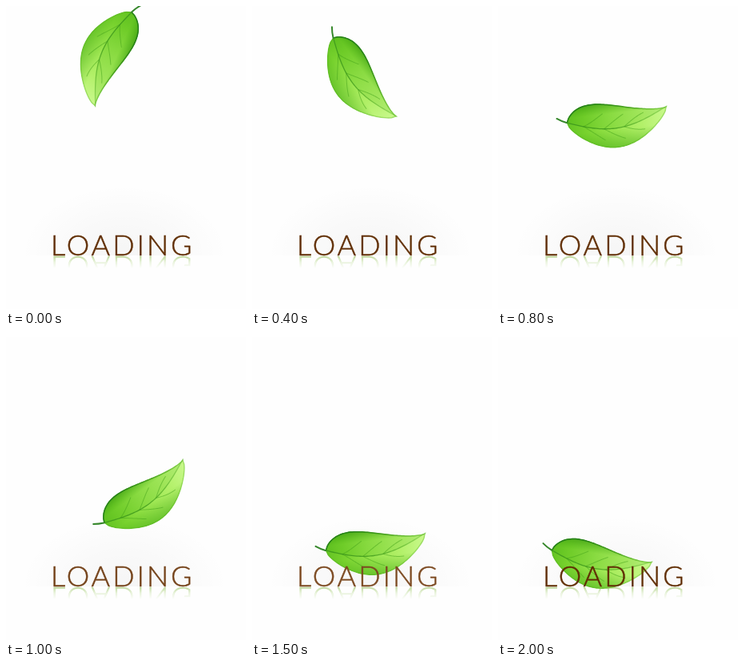
An HTML page with a canvas for the animation above (2500 ms loop, 300 px wide and 379 px high).

```html
<!DOCTYPE html>
<html lang="en">
<head>
<meta charset="utf-8">
<title>Loading</title>
<style>
html, body { margin: 0; width: 100%; height: 100%; overflow: hidden; background: #fefefe; }
canvas { display: block; }
</style>
</head>
<body>
<canvas id="stage" width="300" height="379" aria-label="Loading"></canvas>
<script>
const ctx = document.getElementById('stage').getContext('2d');
const STEP = 100, LOOP = 2500, LAST = 20, BASE = 312;
const LENGTH = 139, STEM = 12;

// Key poses: step, centre x, centre y, angle in degrees
const poses = [
  [0, 140, 62.5, 114], [4, 140.5, 82, 54], [8, 142, 133, -6.6], [10, 165, 193.5, -36],
  [12, 195, 216.5, -42], [13, 185, 232, -36], [15, 148, 253.5, -7], [18, 124.5, 269.5, 9.5]
];

// Smooth spline through the key poses
function poseAt(t) {
  let i = 0;
  while (i < poses.length - 2 && t > poses[i + 1][0]) i++;
  const b = poses[i], c = poses[i + 1];
  const a = poses[i - 1] || b, d = poses[i + 2] || c;
  const span = c[0] - b[0], u = Math.min(1, (t - b[0]) / span);
  const u2 = u * u, u3 = u2 * u;
  return [1, 2, 3].map(n => {
    const m0 = (c[n] - a[n]) / (c[0] - a[0]) * span;
    const m1 = (d[n] - b[n]) / (d[0] - b[0]) * span;
    return b[n] * (2 * u3 - 3 * u2 + 1) + m0 * (u3 - 2 * u2 + u) + c[n] * (3 * u2 - 2 * u3) + m1 * (u3 - u2);
  });
}

// The blade runs from u = 0 at the stem to u = 1 at the tip
const sinPi = u => Math.max(0, Math.sin(Math.PI * u));
const ribY = u => 6.5 * (1 - u) + 17 * sinPi(u);
const upperY = u => ribY(u) - 127 * u ** .75 * (1 - u) ** 1.4;
const lowerY = u => ribY(u) + 24.5 * Math.sqrt(sinPi(u));

function plot(path, f, from = 0, to = 1) {
  for (let i = 0; i <= 60; i++) {
    const u = from + (to - from) * i / 60;
    path.lineTo(STEM + u * (LENGTH - STEM), f(u));
  }
  return path;
}

function ramp(gradient, ...colors) {
  colors.forEach((c, i) => gradient.addColorStop(i / (colors.length - 1), c));
  return gradient;
}
const along = (...colors) => ramp(ctx.createLinearGradient(0, 0, LENGTH, 0), ...colors);
const across = (y0, y1, ...colors) => ramp(ctx.createLinearGradient(0, y0, 0, y1), ...colors);

const upperEdge = plot(new Path2D(), upperY);
const midrib = plot(new Path2D(), ribY);
const body = plot(plot(new Path2D(), upperY), lowerY, 1, 0);
const topHalf = plot(plot(new Path2D(), upperY), ribY, 1, 0);
const stem = new Path2D(`M.5 0Q6 4 ${STEM} 6.5`);
const veins = new Path2D();
for (const edge of [upperY, lowerY]) {
  for (const start of [.16, .36, .56]) {
    const vein = u => {
      const k = (u - start) / .2;
      return ribY(u) + (edge(u) - ribY(u)) * .6 * k;
    };
    const part = plot(new Path2D(), vein, start, start + .2);
    veins.addPath(part);
  }
}

const bladeFill = along('#58bb1c', '#78d22e', '#98e44c', '#b2f068', '#caf98e');
const topShade = across(-13, 16, 'rgba(40,140,5,.6)', 'rgba(60,170,10,.15)', 'rgba(60,170,10,.15)');
const lowShade = across(22, 45, 'rgba(60,165,15,0)', 'rgba(60,165,15,.5)');
const edgeTint = along('#25801a', '#25801a', 'rgba(50,140,20,.6)', 'rgba(110,200,50,.3)');
const ribTint = along('#3f9a1c', 'rgba(63,154,28,.8)', 'rgba(90,180,40,.4)');

function line(path, color, width) {
  ctx.strokeStyle = color;
  ctx.lineWidth = width;
  ctx.stroke(path);
}

function fill(path, color) {
  ctx.fillStyle = color;
  ctx.fill(path);
}

function drawLeaf(t) {
  const [x, y, angle] = poseAt(t);
  ctx.save();
  ctx.translate(x, y);
  ctx.rotate(angle * Math.PI / 180);
  ctx.translate(-LENGTH / 2, 0);
  ctx.lineCap = 'round';
  ctx.save();
  ctx.clip(body);
  fill(body, bladeFill);
  fill(body, lowShade);
  fill(topHalf, topShade);
  line(body, 'rgba(80,175,30,.35)', 3);
  line(upperEdge, edgeTint, 3);
  ctx.restore();
  line(veins, 'rgba(65,160,25,.5)', 1);
  line(midrib, ribTint, 1.3);
  line(stem, '#35872a', 2);
  ctx.restore();
}

function drawFloor() {
  ctx.save();
  ctx.translate(148, BASE);
  ctx.scale(1, .68);
  const glow = ctx.createRadialGradient(0, 0, 0, 0, 0, 130);
  ctx.fillStyle = ramp(glow, 'rgba(0,0,0,.035)', 'rgba(0,0,0,.018)', 'rgba(0,0,0,0)');
  ctx.fillRect(-150, -150, 300, 150);
  ctx.restore();
}

function drawWord(t) {
  ctx.font = '300 36px Lato, "Open Sans", sans-serif';
  ctx.letterSpacing = '3px';
  ctx.lineWidth = .5;
  const light = sinPi((t - 8) / 10) * (t > 8 && t < 18);
  const ink = `rgb(${96 + 34 * light},${46 + 34 * light},${4 + 36 * light})`;
  const write = (color, y, flip) => {
    ctx.save();
    ctx.translate(56, y);
    ctx.scale(1, flip);
    ctx.fillStyle = ctx.strokeStyle = color;
    ctx.fillText('LOADING', 0, 0);
    ctx.strokeText('LOADING', 0, 0);
    ctx.restore();
  };
  write(across(0, -15, 'rgba(140,185,80,.5)', 'rgba(150,200,90,.18)', 'rgba(150,200,90,0)'), BASE + 1, -1);
  write(ink, BASE, 1);
}

function frame(now) {
  const t = Math.min(LAST, Math.floor((now % LOOP) / STEP));
  ctx.fillStyle = '#fefefe';
  ctx.fillRect(0, 0, 300, 379);
  drawFloor();
  drawLeaf(t);
  drawWord(t);
  requestAnimationFrame(frame);
}
requestAnimationFrame(frame);
</script>
</body>
</html>
```
